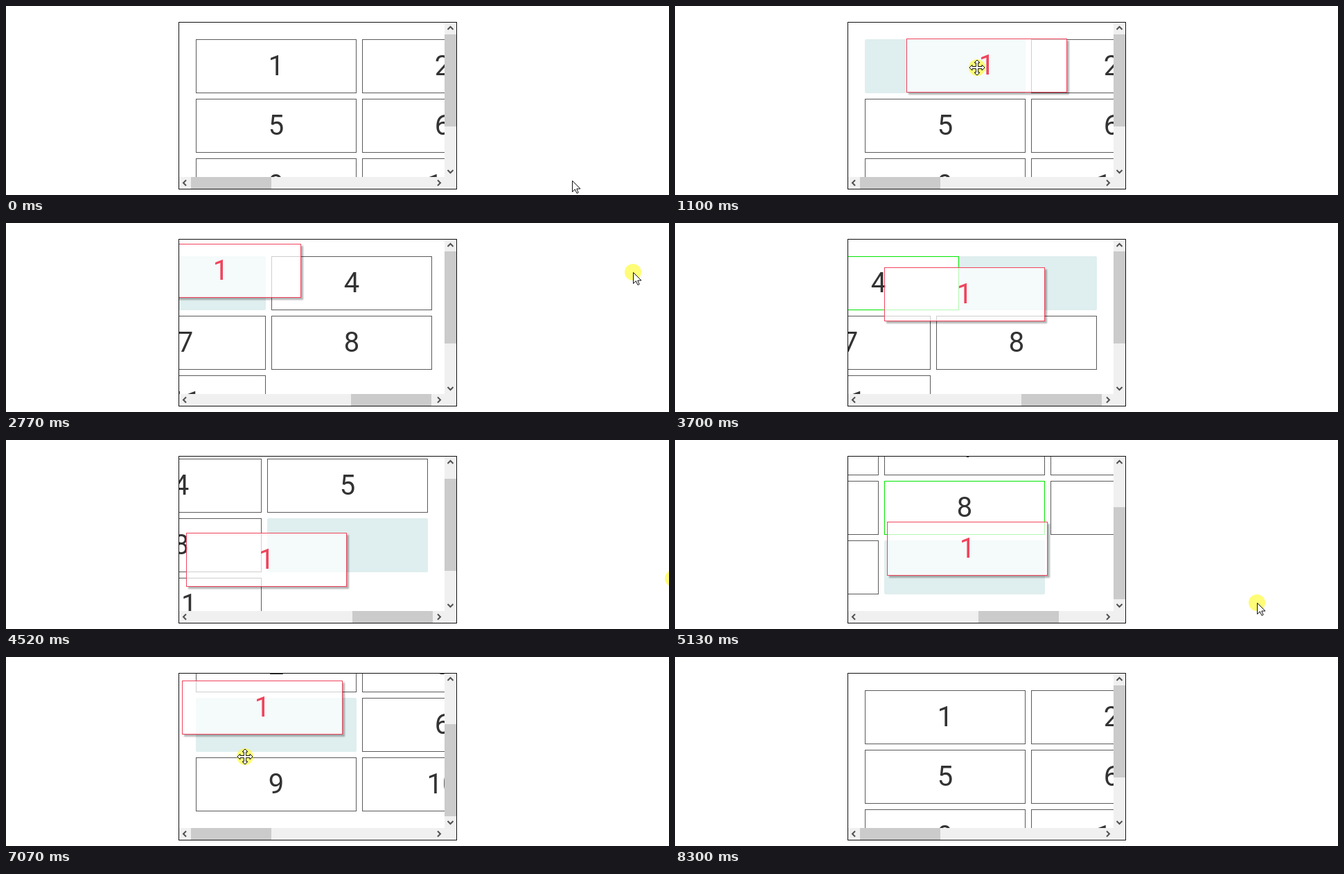
An HTML page for the animation above (8.81 s loop, 957 px wide and 273 px high).

```html
<!DOCTYPE html>
<html lang="en">
<head>
<meta charset="utf-8">
<title>Drag and auto-scroll grid</title>
<style>
html, body { margin: 0; width: 100%; height: 100%; overflow: hidden; background: #fff; }
.stage { position: relative; width: 957px; height: 273px; overflow: hidden; }
.stage div, .stage svg { position: absolute; box-sizing: border-box; }
.frame { left: 249px; top: 23px; width: 402px; height: 242px; border: 1px solid #111; background: #f0f0f0; }
.view { left: 0; top: 0; width: 383px; height: 223px; overflow: hidden; background: #fff; }
.content { left: 0; top: 0; width: 1000px; height: 298px; }
.content div {
  left: 0; top: 0; width: 232px; height: 78px;
  font: 40px/76px Roboto, Arial, sans-serif; text-align: center; color: #333;
}
.content .item { background: #fff; border: 1px solid #5a5a5a; }
.content .lit { border-color: #00e600; }
.content .slot { background: #dfeeee; border-radius: 2px; }
.content .drag {
  background: rgba(255, 255, 255, .7); border: 1px solid #f0445c; color: #f0445c;
  box-shadow: 3px 3px 2px rgba(0, 0, 0, .3);
}
.thumb { background: #cbcbcb; }
.hover { background: #a6a6a6; }
.bar-x { left: 17px; top: 223px; width: 116px; height: 17px; }
.bar-y { left: 383px; top: 17px; width: 17px; height: 133px; }
.arrows { left: 0; top: 0; fill: none; stroke: #505050; stroke-width: 2; }
.pointer { left: 0; top: 0; overflow: visible; }
.pointer path { fill: #fff; stroke: #111; }
</style>
</head>
<body>
<div class="stage">
  <div class="frame">
    <div class="view"><div class="content"></div></div>
    <div class="thumb bar-x"></div>
    <div class="thumb bar-y"></div>
    <svg class="arrows" width="400" height="240">
      <path d="M387.5 10l4-4 4 4M387.5 213l4 4 4-4M10 227.5l-4 4 4 4M373 227.5l4 4-4 4"/>
    </svg>
  </div>
  <svg class="pointer" width="1" height="1">
    <circle r="12" fill="rgba(255,250,20,.58)"/>
    <path class="arrow" d="M.5.5V16.5L4.3 12.8 7 18.5 9.2 17.5 6.8 12H12z"/>
    <path class="move" d="M0-11l4 4h-2.5v5.5h5.5V-4l4 4-4 4V1.5H1.5V7H4l-4 4-4-4h2.5V1.5H-7V4l-4-4 4-4v2.5h5.5V-7H-4z"/>
  </svg>
</div>
<script>
const LOOP = 8810, PICK = 540, DROP = 7970;
const LAG = 40, DELAY = 60, SLIDE = 250, GLOW = 400;
const COUNT = 11, COLS = 4, PITCH = { x: 240, y: 86 }, PAD = 24;
const CARD = { w: 232, h: 78 }, GAP_EDGE = 18;
// From the pointer to the card's corner in content coordinates
const GRIP = { x: 91 + 250, y: 42 + 24 };
const MAX = { x: 617, y: 75 }, TRAVEL = { x: 233, y: 56 };

// Turning points of the motion: time, then values
const POINTER = [
  [40, 817, 252], [400, 345, 91], [PICK, 345, 90], [1830, 649, 87],
  [3240, 962, 66], [3470, 962, 66], [3660, 1010, 106], [4400, 975, 190],
  [5130, 840, 235], [6140, 479, 239], [6180, 477, 239], [6540, 355, 222],
  [7070, 345, 144], [7340, 345, 90], [DROP, 345, 90], [8300, 900, 290]
];
const SCROLL_X = [[1130, 0], [1830, 348], [2900, MAX.x], [4650, MAX.x], [5130, 452], [6050, 0]];
const SCROLL_Y = [[4400, 0], [4750, MAX.y], [7110, MAX.y], [7450, 0]];

const $ = s => document.querySelector(s);
const place = (el, x, y) => { el.style.transform = `translate(${Math.round(x)}px, ${Math.round(y)}px)`; };
const show = (el, on) => { el.style.visibility = on ? 'visible' : 'hidden'; };
const clamp = (v, lo, hi) => Math.max(lo, Math.min(hi, v));

// Smooth curve through the keys that never overshoots them
function track(keys, t, axis = 1) {
  const end = keys.length - 1;
  if (t <= keys[0][0]) return keys[0][axis];
  if (t >= keys[end][0]) return keys[end][axis];
  const slope = i => (keys[i + 1][axis] - keys[i][axis]) / (keys[i + 1][0] - keys[i][0]);
  const tangent = i => {
    if (i === 0 || i === end) return 0;
    const a = slope(i - 1), b = slope(i);
    return a * b > 0 ? 2 * a * b / (a + b) : 0;
  };
  const i = keys.findIndex(k => k[0] > t) - 1;
  const span = keys[i + 1][0] - keys[i][0];
  const u = (t - keys[i][0]) / span, v = 1 - u;
  return keys[i][axis] * v * v * (1 + 2 * u) + keys[i + 1][axis] * u * u * (1 + 2 * v)
    + span * u * v * (tangent(i) * v - tangent(i + 1) * u);
}

const cell = i => ({ x: PAD + i % COLS * PITCH.x, y: PAD + Math.floor(i / COLS) * PITCH.y });

// The dragged card trails the pointer slightly
function dragAt(t) {
  const late = Math.max(PICK, t - LAG);
  return { x: track(POINTER, late, 1) - GRIP.x, y: track(POINTER, late, 2) - GRIP.y };
}

function indexAt(t) {
  const d = dragAt(t);
  const col = clamp(Math.floor((d.x + CARD.w / 2 - GAP_EDGE) / PITCH.x), 0, COLS - 1);
  const row = clamp(Math.floor((d.y + CARD.h / 2 - GAP_EDGE) / PITCH.y), 0, 2);
  return Math.min(row * COLS + col, COUNT - 1);
}

// Every move of card 1 to a new index, with the card that fills its old place
const start = Array.from({ length: COUNT }, (_, i) => i + 1);
const swaps = [];
for (let t = PICK, from = 0, before = start; t < DROP; t += 5) {
  const to = indexAt(t);
  if (to === from) continue;
  const order = before.filter(n => n !== 1);
  order.splice(to, 0, 1);
  swaps.push({ t, before, order, filler: order[from] });
  from = to;
  before = order;
}

const content = $('.content');
const add = (cls, text) => {
  const el = document.createElement('div');
  el.className = cls;
  el.textContent = text;
  return content.appendChild(el);
};
const slot = add('slot', '');
const items = start.map(n => add('item', n));
const drag = add('drag', '1');
const barX = $('.bar-x'), barY = $('.bar-y'), pointer = $('.pointer');
const halo = $('circle'), arrow = $('.arrow'), move = $('.move');

function drawCards(t, held) {
  const seen = swaps.filter(s => s.t <= t).pop();
  const done = swaps.filter(s => s.t + DELAY <= t).pop() || { t: 0, before: start, order: start };
  const ease = 1 - (1 - clamp((t - done.t - DELAY) / SLIDE, 0, 1)) ** 3;
  items.forEach((el, i) => {
    const a = cell(done.before.indexOf(i + 1)), b = cell(done.order.indexOf(i + 1));
    place(el, a.x + (b.x - a.x) * ease, a.y + (b.y - a.y) * ease);
    el.classList.toggle('lit', Boolean(held && seen && seen.filler === i + 1 && t - seen.t < GLOW));
  });
  const home = cell(done.order.indexOf(1)), d = dragAt(t);
  place(slot, home.x, home.y);
  place(drag, d.x, d.y);
  show(items[0], !held);
  show(slot, held);
  show(drag, held);
}

function draw(t) {
  const held = t >= PICK && t < DROP;
  const x = track(POINTER, t, 1), y = track(POINTER, t, 2);
  const sx = track(SCROLL_X, t), sy = track(SCROLL_Y, t);
  const thumbY = sy / MAX.y * TRAVEL.y;
  drawCards(t, held);
  place(content, -sx, -sy);
  place(barX, sx / MAX.x * TRAVEL.x, 0);
  place(barY, 0, thumbY);
  const overThumb = x >= 633 && x < 650 && y >= 41 + thumbY && y < 174 + thumbY;
  barY.classList.toggle('hover', overThumb);
  const inside = x > 250 && x < 633 && y > 24 && y < 232;
  place(pointer, x, y);
  show(halo, held);
  show(arrow, !inside);
  show(move, inside);
}

const begin = performance.now();
function tick() {
  draw((performance.now() - begin) % LOOP);
  requestAnimationFrame(tick);
}
tick();
</script>
</body>
</html>
```
